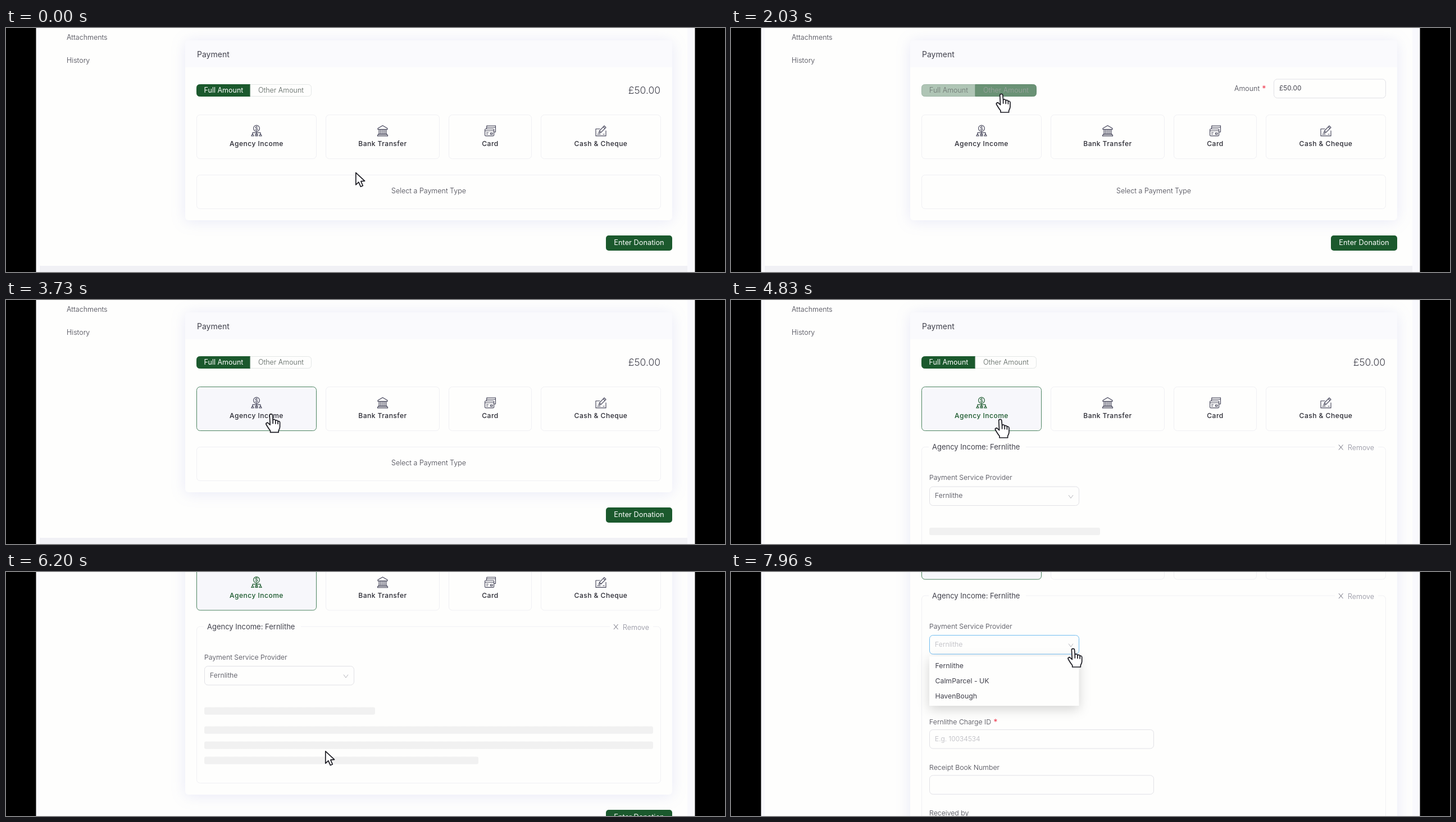
An HTML page for the animation above (8 s loop, 1280 by 434 pixels).

```html
<!DOCTYPE html>
<html lang="en">
<head>
<meta charset="utf-8">
<title>Donation payment form</title>
<style>
  html, body { margin: 0; width: 100%; height: 100%; overflow: hidden; background: #000; }
  svg { display: block; width: 100%; height: 100%; }
  text { font-family: Inter, "Open Sans", sans-serif; font-weight: 300; fill: #41414c; white-space: pre; }
  .regular { font-weight: 400; }
  .strong { font-weight: 500; fill: #2b2b34; letter-spacing: .45px; }
  .mid { text-anchor: middle; }
  .end { text-anchor: end; }
  .white { fill: #fff; }
  .muted { fill: #8b8b99; }
  .faint { fill: #b6b6bc; }
  .required { fill: #f0485c; font-weight: 500; font-size: 14px; }
  .field { fill: #fefefd; stroke: #e1e1e6; }
  .outline { fill: none; stroke: #f0f0f4; }
  .icon { fill: none; stroke: #45455a; stroke-width: 1.15; stroke-linejoin: round; }
  .icon text { fill: #45455a; stroke: none; font-weight: 500; }
  .chosen .icon { stroke: #1b592d; }
  .chosen text, .chosen .icon text { fill: #1b592d; }
  #card { fill: #fefefd; filter: drop-shadow(0 2px 13px rgba(84, 94, 210, .13)); }
  #menu rect { fill: #fefefd; filter: drop-shadow(0 6px 10px rgba(0, 0, 0, .17)); }
  #cursor path { fill: #fff; stroke: #1d1d24; stroke-width: 1.7; stroke-linejoin: round; stroke-linecap: round; }
</style>
</head>
<body>
<script>
const LOOP = 8000, GREEN = '#1b592d', SCROLL = 219.4;
const PROVIDERS = ['Fernlithe', 'CalmParcel - UK', 'HavenBough'];

// ---------- markup helpers ----------
const text = (x, y, str, cls = '', size = 12.5, id = '') =>
  `<text x="${x}" y="${y}" class="${cls}" font-size="${size}" id="${id}">${str}</text>`;
const rect = (x, y, w, h, r = 0, attrs = '') =>
  `<rect x="${x}" y="${y}" width="${w}" height="${h}" rx="${r}" ${attrs}/>`;
const path = (d, attrs = '') => `<path d="${d}" ${attrs}/>`;
const star = '<tspan class="required" dx="4" dy="1">*</tspan>';

const icons = {
  agency: '<circle cx="10" cy="6" r="5.4"/>' + text(10, 9.2, '$', 'mid', 9) +
    path('M10 11.4V19M3 16V13.6H17V16M3 15.5L.8 19.5H5.2ZM8 16h4v3.5H8ZM17 15.5l-2.2 4h4.4Z'),
  bank: path('M1.5 6L10 1l8.5 5v1.8H1.5ZM3.5 8v8M6 8v8M8.7 8v8M11.3 8v8M14 8v8M16.5 8v8M2.5 16h15v1.7H2.5ZM1 17.7h18v2H1Z'),
  card: path('M3.5 7V5M3.5 5l.5-3.8H19.5V12.5H17M4 4H19.5') + rect(.6, 7, 16, 12.4, 1.5) +
    path('M.6 10.2h16M3 13.5h4M3 16.2h3M10.5 14h3.5v2.6h-3.5Z'),
  cheque: path('M8.5 7H1V19.4H19V10M6.3 14.5l1.2-4.2L16 1.5l3 3-8.6 8.7ZM14.3 3.4l3 3M7.5 10.3l2.9 2.9M3.5 16.5h6M13.5 16.5h3')
};

const method = (left, right, label, icon, id = '') => {
  const center = (left + right) / 2;
  return `<g id="${id}">${rect(left, 154.5, right - left, 78, 6, 'class="outline"')}
    <g class="icon" transform="translate(${center - 10} 172.5)">${icons[icon]}</g>
    ${text(center, 210, label, 'strong mid', 12.1)}</g>`;
};

const bar = (y, w) => rect(353, y, w, 13.3, 3, 'fill="url(#shimmer)"');
const label = (y, str) => text(353, y, str, '', 12.3);
const input = y => rect(353.5, y, 399, 33.5, 6, 'class="field"');

document.body.innerHTML = `
<svg viewBox="0 0 1280 434">
  <defs><linearGradient id="shimmer">
    <stop offset=".25" stop-color="#f1f1f1"/><stop offset=".37" stop-color="#e4e4e5"/><stop offset=".63" stop-color="#f1f1f1"/>
  </linearGradient></defs>
  ${rect(0, 0, 1280, 434)}
  ${rect(53.5, 0, 1173, 434, 0, 'fill="#f9f9fd"')}
  ${rect(60, 0, 1153, 434, 0, 'fill="#fefefd"')}
  <g id="page">
    ${text(108, 21, 'Attachments')}${text(108, 62, 'History')}
    <g id="footer">
      ${rect(60, 423, 1153, 200, 0, 'fill="#f1f1f5"')}
      ${rect(1068, 369, 118, 27, 5, `fill="${GREEN}"`)}
      ${text(1127, 386.3, 'Enter Donation', 'regular mid white', 12.8)}
    </g>
    ${rect(319, 22, 867, 320, 6, 'id="card"')}
    ${path('M319 70V28q0-6 6-6h855q6 0 6 6v42z', 'fill="#fafafd"')}
    ${text(340, 52, 'Payment', 'regular', 14)}

    ${path('M435 100.5H345.5q-6 0-6 6v9q0 6 6 6H435z', 'id="full"')}
    ${path('M435 100.5H537.5q6 0 6 6v9q0 6-6 6H435z', 'id="other"')}
    ${text(387.5, 115, 'Full Amount', 'mid', 12.5, 'fullText')}
    ${text(489.5, 115, 'Other Amount', 'mid', 12.5, 'otherText')}
    ${text(1165, 117, '£50.00', 'end', 17.5, 'total')}
    <g id="amount">
      ${text(896, 111.5, 'Amount' + star)}
      ${rect(966.5, 91, 199, 33.5, 6, 'class="field"')}${text(976, 111.3, '£50.00', 'regular', 11.8)}
    </g>

    ${method(339.5, 552.5, 'Agency Income', 'agency', 'agency')}
    ${method(569.5, 771.5, 'Bank Transfer', 'bank')}
    ${method(788.5, 935.5, 'Card', 'card')}
    ${method(952.5, 1165.5, 'Cash &amp; Cheque', 'cheque')}

    <g id="empty">
      ${rect(339.5, 261.5, 826, 60, 6, 'class="outline"')}
      ${text(752.5, 294, 'Select a Payment Type', 'mid')}
    </g>
    <g id="form">
      ${rect(339.5, 261.5, 826, 60, 6, 'class="outline" id="fieldset"')}
      ${rect(352, 258, 173, 8, 0, 'fill="#fefefd"')}${rect(1075, 258, 77, 8, 0, 'fill="#fefefd"')}
      ${text(358, 266.3, 'Agency Income: ' + PROVIDERS[0], 'regular', 13)}
      ${path('M1082 257.5l7.5 9M1089.5 257.5l-7.5 9', 'stroke="#6e6e7c"')}
      ${text(1098, 267, 'Remove', 'muted')}
      ${label(320.3, 'Payment Service Provider')}
      ${rect(353.5, 332, 266, 33.5, 6, 'class="field" id="select"')}
      ${text(363, 352.3, PROVIDERS[0], '', 12.3, 'selectText')}
      ${path('M601 347l4 5.5 4-5.5', 'fill="none" stroke="#b4b4ba"')}
      <g id="skeleton">${bar(405, 304)}${bar(439, 799)}${bar(466, 799)}${bar(493, 488)}</g>
      <g id="details">
        ${label(490.3, PROVIDERS[0] + ' Charge ID' + star)}
        ${input(499.9)}${text(363, 520.3, 'E.g. 10034534', 'faint', 12)}
        ${label(571.4, 'Receipt Book Number')}${input(581.2)}
        ${label(652.8, 'Received by')}
      </g>
      <g id="menu">
        ${rect(353, 369.4, 266.5, 88)}
        ${PROVIDERS.map((name, i) => text(363.5, 390.4 + 27 * i, name, 'regular', 12.3)).join('')}
      </g>
    </g>
  </g>
  <g id="cursor">
    <g id="arrow">${path('M.8.8V22.3l5-4.6 3.6 8 3.9-1.7-3.5-7.8 6.8-.6Z')}</g>
    <g id="hand">
      ${path('M-2.3 2.8C-2.3-.2 2.6-.4 2.8 2.6L3.6 11C5 9.2 8 9.8 8.2 12 9.6 10.8 12.2 11.4 12.4 13.4 14 12.6 16 13.4 16 15.6V23C16 26 14.5 28 13.6 30V33H-1V30C-3.5 27-6 23-8.3 19-9.6 16.8-6.5 14.6-4.6 16.6L-1.4 19.6Z')}
      ${path('M3.6 11v6M8.2 12v5.5M12.4 13.4v4.5')}
    </g>
  </g>
</svg>`;

const el = Object.fromEntries([...document.querySelectorAll('[id]:not([id=""])')].map(node => [node.id, node]));

// ---------- timing helpers ----------
const phase = (t, from, to) => Math.min(1, Math.max(0, (t - from) / (to - from)));
const bezier = (x1, y1, x2, y2) => x => {
  const curve = (a, b, s) => 3 * a * s * (1 - s) ** 2 + 3 * b * s * s * (1 - s) + s ** 3;
  let lo = 0, hi = 1;
  for (let i = 0; i < 24; i++) {
    const mid = (lo + hi) / 2;
    if (curve(x1, x2, mid) < x) lo = mid; else hi = mid;
  }
  return x <= 0 ? 0 : x >= 1 ? 1 : curve(y1, y2, lo);
};
const inOut = bezier(.645, .045, .355, 1);
const ease = bezier(.25, .1, .25, 1);
const quad = p => p < .5 ? 2 * p * p : 1 - 2 * (1 - p) ** 2;
const mix = (a, b, k) => `color-mix(in srgb, ${b} ${100 * k}%, ${a})`;
const show = (node, on) => { node.style.display = on ? '' : 'none'; };

// start, end, x, y, bend (above 1 lets the vertical part lag)
const moves = [
  [560, 1160, 481, 117, 1.75],
  [2500, 2900, 398, 108, 1],
  [3400, 3860, 479, 212, 1],
  [5100, 5600, 568, 318, 1],
  [6960, 7560, 608.7, 136, 1]
];
function cursorAt(t) {
  let x = 622, y = 256.5;
  for (const [from, to, endX, endY, bend] of moves) {
    const p = inOut(phase(t, from, to));
    x += (endX - x) * p;
    y += (endY - y) * p ** bend;
  }
  return [x, y];
}

function paintSegment(shape, caption, active) {
  shape.style.fill = mix('#fefefd', GREEN, active);
  shape.style.stroke = mix('#e4e7e6', GREEN, active);
  caption.style.fill = mix('#56605b', '#ffffff', active ** 2);
  caption.style.fontWeight = active > .9 ? 400 : 300;
}

function draw(t) {
  const selected = t >= 4830, loaded = t >= 7000;
  const editing = t >= 1860 && t < 3200;
  const scroll = SCROLL * quad(phase(t, 5655, 6500));
  const extra = loaded ? 600 : selected ? SCROLL - 1 : 0;
  const other = inOut(phase(t, 1860, 2170)) - inOut(phase(t, 3170, 3470));
  const [x, y] = cursorAt(t);
  const over = (left, top, right, bottom) =>
    x >= left && x <= right && y + scroll >= top && y + scroll <= bottom;

  el.page.setAttribute('transform', `translate(0 ${-scroll})`);
  el.footer.setAttribute('transform', `translate(0 ${extra})`);
  el.card.setAttribute('height', 320 + extra);
  el.fieldset.setAttribute('height', 60 + extra);

  paintSegment(el.full, el.fullText, 1 - other);
  paintSegment(el.other, el.otherText, other);
  show(el.amount, editing);
  show(el.total, !editing);

  const overAgency = over(340, 155, 552, 232);
  const agencyBox = el.agency.querySelector('rect');
  agencyBox.style.fill = selected || overAgency ? '#f7f7fb' : 'none';
  agencyBox.style.stroke = selected || overAgency ? '#4c8460' : '';
  el.agency.classList.toggle('chosen', selected);

  show(el.empty, !selected);
  show(el.form, selected);
  show(el.skeleton, !loaded);
  show(el.details, loaded);

  const sweep = 3 * ease(((t + 1400 - 580) % 1400) / 1400) - 3;
  el.shimmer.setAttribute('x1', sweep);
  el.shimmer.setAttribute('x2', sweep + 4);

  const overSelect = loaded && over(353, 332, 619, 365);
  const open = ease(phase(t, 7620, 7850));
  el.select.style.stroke = overSelect ? '#6fbcf0' : '';
  el.selectText.style.fill = open > 0 ? '#b6b6bc' : '';
  el.menu.setAttribute('opacity', open);
  el.menu.setAttribute('transform', `translate(0 369) scale(1 ${.8 + .2 * open}) translate(0 -369)`);

  const pointing = overAgency || overSelect || over(339, 100, 544, 122);
  el.cursor.setAttribute('transform', `translate(${x} ${y})`);
  show(el.hand, pointing);
  show(el.arrow, !pointing);
}

function frame() {
  draw(performance.now() % LOOP);
  requestAnimationFrame(frame);
}
frame();
</script>
</body>
</html>
```
